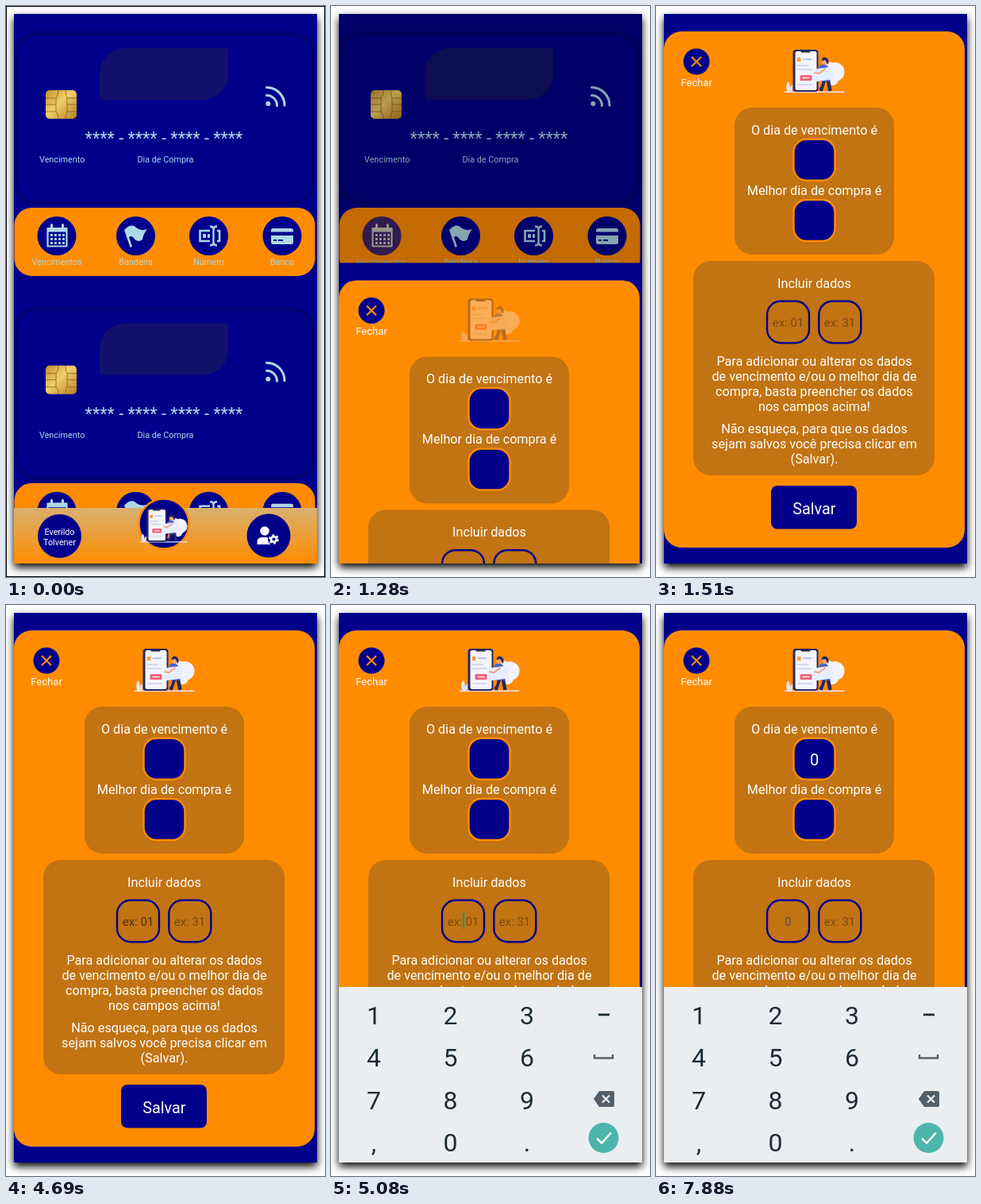
An HTML page that plays this animation: 402x719 px, repeating every 8 s.

```html
<!DOCTYPE html>
<html lang="pt">
<head>
<meta charset="utf-8">
<style>
html, body { margin: 0; width: 100%; height: 100%; overflow: hidden; background: #fff; }
#edge { position: absolute; inset: 0; border: 1px solid #000; }
#phone { position: absolute; left: 10px; top: 10px; width: 382px; height: 692px; overflow: hidden;
  background: #00008b; box-shadow: 0 5px 10px #000; }
svg { display: block; font-family: Roboto, sans-serif; }
</style>
</head>
<body>
<div id="phone"></div>
<div id="edge"></div>
<script>
const NAVY = '#00008b', ORANGE = '#ff8c00', ICE = '#add8e6', PANEL = '#c27312', HINT = '#7b4a12';

const text = (x, y, size, fill, s, extra = 'text-anchor="middle"') =>
  `<text x="${x}" y="${y}" font-size="${size}" fill="${fill}" ${extra}>${s}</text>`;
const rect = (x, y, w, h, r, fill, extra = '') =>
  `<rect x="${x}" y="${y}" width="${w}" height="${h}" rx="${r}" fill="${fill}" ${extra}/>`;
const disc = (x, y, r, fill, extra = '') => `<circle cx="${x}" cy="${y}" r="${r}" fill="${fill}" ${extra}/>`;
const line = (d, color, w, extra = '') =>
  `<path d="${d}" fill="none" stroke="${color}" stroke-width="${w}" ${extra}/>`;
const shape = (d, fill) => `<path d="${d}" fill="${fill}"/>`;
const group = (content, extra = '') => `<g ${extra}>${content}</g>`;

// Person holding a card beside a phone, 76 x 55
const art = () =>
  rect(0, 53.5, 76, 1.5, .7, '#e9e6f7') +
  shape('M4 54Q1 46 5 41Q9 46 7 54M7 54Q7 47 11 45Q12 50 9 54', '#dfe3f5') +
  disc(64, 29, 12, '#f1f2fc') + disc(56, 23, 7, '#f1f2fc') + disc(61, 39, 7, '#f1f2fc') +
  rect(11, 1, 32, 53, 4, '#27275c') + rect(14, 3, 27, 49, 2.5, '#f4f4fd') +
  rect(21, 2, 12, 2.5, 1, '#27275c') + rect(16, 11, 5, 5, 1, '#ff9d3c') +
  rect(23, 12, 12, 2, 1, '#b9c4ee') + rect(16, 20, 15, 2, 1, '#d3d8f2') +
  rect(16, 25, 19, 2, 1, '#d3d8f2') + rect(20, 33, 15, 7, 1.5, '#f0607c') +
  line('M23 36.5h9', '#fff', 1.3) + rect(17, 44, 18, 2, 1, '#d3d8f2') +
  line('M51 38L46 53M55 38L58 53', '#27275c', 4.5) + line('M47 41L45 48', '#f18a3d', 2.5) +
  shape('M44 22Q50 16 56 23L58 41H46Z', '#4961c8') +
  disc(51, 16, 4, '#f3a27c') + shape('M47 15Q48 9 53 11Q58 14 55 20L52 14Z', '#27275c') +
  rect(37, 24, 24, 16, 2, '#e6edff', 'transform="rotate(-8 49 32)"') +
  line('M52 25L44 31L38 30', '#f3a27c', 2);

const icons = [
  line('M52.5 280h24v22.5h-24z', ICE, 2.2, 'stroke-linejoin="round"') + rect(52, 279, 25, 5.5, 1, ICE) +
    line('M57.5 275.5v6M71.5 275.5v6', ICE, 3, 'stroke-linecap="round"') +
    line('M56 288.5h18M56 293.5h18M56 298.5h18', ICE, 2.8, 'stroke-dasharray="2.8 2.25"'),
  shape('M149 282Q158 273 164 279Q170 284 178 281Q173 287 172 294Q165 299 160 291Q157 289 155 291L159 303L156.5 304Z', ICE),
  line('M257 283h-12.5v13h12.5M266 283h3v13h-3', ICE, 2.6) +
    line('M257 277.5q4.500 0 4.500 4v16q0 4 -4.500 4M266 277.500q-4.500 0 -4.500 4v16q0 4 4.500 4', ICE, 2.4) +
    rect(248, 287, 4, 5, 1, ICE) + rect(254, 287, 3, 5, 1, ICE),
  rect(334, 280, 28, 20, 2.5, ICE) + rect(334, 284.5, 28, 4.5, 0, NAVY) +
    line('M337 295h4M343 295h6', NAVY, 2),
];
const labels = ['Vencimentos', 'Bandeira', 'Número', 'Banco'];
const columns = [64, 163.5, 255.5, 348];

const buttons = () => rect(10.5, 254, 379, 86, 22, ORANGE) + columns.map((x, i) =>
  group(disc(x, 289.5, 24.5, NAVY) + icons[i] + text(x, 326, 10.9, ICE, labels[i]), `class="button${i}"`)).join('');

const card = () =>
  rect(14, 37, 371, 209, 25, NAVY, 'style="filter:drop-shadow(0 0 4px #0009)"') +
  shape('M118 85A32 32 0 0 1 150 53H275Q280 53 280 58V86A32 32 0 0 1 248 118H123Q118 118 118 113Z', '#11116b') +
  rect(50, 106, 39, 36, 5, 'url(#gold)') +
  line('M50 116h13v17h-13M63 124h-13M89 116h-12v17h12M77 124h12M63 116q3 -4 3 -10M77 116q-2 -4 -2 -10M63 133q3 3 3 9M77 133q-2 3 -2 9', '#8a6420', .8) +
  disc(330.3, 123, 3, ICE) +
  line('M328.500 112.500a13 13 0 0 1 13 13M328.500 102.500a22.500 22.500 0 0 1 22.500 22.500', ICE, 3, 'stroke-linecap="round"') +
  text(199, 174, 21.6, ICE, Array(4).fill('****').join(' - ')) +
  text(42, 197, 10.8, ICE, 'Vencimento', '') + text(165.5, 197, 10.8, ICE, 'Dia de Compra', '');

const navBar = () =>
  rect(10, 632, 382, 70, 0, 'url(#nav)') +
  disc(67.5, 667.5, 27.5, NAVY) + text(67.5, 666, 10.8, '#fff', 'Everildo') + text(67.5, 679, 10.8, '#fff', 'Tolvener') +
  disc(199, 652, 31.5, NAVY, `stroke="${ORANGE}" stroke-width="2.5"`) +
  group(art(), 'transform="translate(168.500 632) scale(.79)"') +
  disc(331, 667, 27.5, NAVY) + disc(326, 661, 5.8, '#fff') +
  shape('M316.500 678v-3q0 -6 6 -6h7l4 9z', '#fff') +
  disc(337.5, 671.5, 7.5, NAVY) + disc(337.5, 671.5, 3.4, 'none', 'stroke="#fff" stroke-width="2.6"') +
  disc(337.5, 671.5, 5.3, 'none', 'stroke="#fff" stroke-width="2" stroke-dasharray="2.8 2.75"');

const valueBox = y => rect(173.5, y, 52, 52, 16, NAVY, `stroke="${ORANGE}" stroke-width="2.400"`);
const field = x => rect(x, 371.8, 53, 52.4, 17, 'none', `stroke="${NAVY}" stroke-width="2.400"`);
const lines = (y, ...rows) => rows.map((s, i) => text(199.5, y + 19 * i, 16.2, '#fff', s)).join('');

const modal = () =>
  rect(10, 10, 382, 692, 0, NAVY) + rect(10, 32, 379, 650, 22, ORANGE) +
  disc(51, 70, 16.5, NAVY) + line('M45 64l12 12M57 64l-12 12', ORANGE, 2.2) + text(51, 100.5, 13.1, '#fff', 'Fechar') +
  group(group(art(), 'transform="translate(161.500 54)"'), 'id="art"') +
  rect(99, 128, 201, 185, 22, PANEL) +
  lines(162, 'O dia de vencimento é') + valueBox(167.7) + text(199.5, 202, 20, '#fff', '', 'id="value" text-anchor="middle"') +
  lines(238, 'Melhor dia de compra é') + valueBox(244) +
  rect(47, 321, 304, 270, 22, PANEL) + lines(355, 'Incluir dados') +
  field(140) + field(205.3) +
  text(166.5, 403.5, 15, HINT, '', 'id="day" text-anchor="middle"') + text(231.5, 403.5, 15, HINT, 'ex: 31') +
  rect(166, 387, 2, 21, 0, '#00967f', 'id="caret"') +
  lines(453, 'Para adicionar ou alterar os dados', 'de vencimento e/ou o melhor dia de',
    'compra, basta preencher os dados', 'nos campos acima!') +
  lines(537.5, 'Não esqueça, para que os dados', 'sejam salvos você precisa clicar em', '(Salvar).') +
  rect(145, 604, 108, 54.5, 8, NAVY) + text(199.3, 640, 19.8, '#fff', 'Salvar');

const keyboard = () =>
  rect(10, 481, 382, 221, 0, '#ebeef1') + rect(103, 651, 96, 50, 4, '#cdd4d9', 'id="press"') +
  ['123', '456', '789', ',0.'].map((row, r) => [...row].map((key, c) =>
    text(54 + 96.5 * c, 527.5 + 53.6 * r, 32, '#1c2d36', key)).join('')).join('') +
  rect(337, 514.5, 14, 2.8, 0, '#1c2d36') + line('M332 566v4.500h23v-4.500', '#546069', 2.4) +
  shape('M331 622l7 -10h17q2 0 2 2v16q0 2 -2 2h-17z', '#546069') +
  line('M342 617.500l9 9M351 617.500l-9 9', '#ebeef1', 2.2) +
  disc(343.5, 671, 19, '#4db6ac') + line('M335 671.500l6 6l12 -13', '#fff', 2.4);

document.getElementById('phone').innerHTML = `<svg width="382" height="692" viewBox="10 10 382 692">
  <defs>
    <linearGradient id="gold" x2="1" y2="1"><stop stop-color="#c5902c"/><stop offset=".45" stop-color="#f1cf69"/>
      <stop offset=".7" stop-color="#d5a744"/><stop offset="1" stop-color="#b98225"/></linearGradient>
    <linearGradient id="nav" x2="0" y2="1"><stop stop-color="#d9b06f"/><stop offset="1" stop-color="#ff8c00"/></linearGradient>
  </defs>` +
  card() + buttons() + group(card() + buttons(), 'transform="translate(0 346.700)"') + navBar() +
  rect(10, 10, 382, 692, 0, '#000', 'id="dim"') +
  group(modal(), 'id="modal"') + group(keyboard(), 'id="keys"') + '</svg>';

const $ = id => document.getElementById(id);
const set = (id, name, value) => $(id).setAttribute(name, value);
const unit = v => Math.min(1, Math.max(0, v));
const within = (t, a, b) => t >= a && t < b;
const firstButton = document.querySelector('.button0');

// The screen refreshes only at these times (ms)
const TICKS = [0, 500, 1200, 1280, 1350, 1430, 1510, 4690, 4770, 4850, 4920, 5000, 5080, 5150,
  5320, 5780, 6250, 6800, 7270, 7350, 7420, 7500, 7880];

function draw(now) {
  const t = TICKS.findLast(s => s <= now % 8000);
  $('edge').style.display = t < 500 ? '' : 'none';

  const rise = (1 - Math.cos(Math.PI * unit((t - 1121) / 300))) / 2;
  set('modal', 'transform', `translate(0 ${692 * (1 - rise)})`);
  set('dim', 'opacity', .43 * rise);
  set('art', 'opacity', unit((t - 1180) / 300));
  firstButton.setAttribute('opacity', t < 1200 ? 1 : .75);

  const open = unit((t - 4790) / 250);
  set('keys', 'transform', `translate(0 ${221 * (1 - open) ** 2})`);

  const typed = t >= 7350;
  $('value').textContent = typed ? '0' : '';
  $('day').textContent = typed ? '0' : 'ex: 01';
  set('day', 'fill', typed ? '#5c5040' : within(t, 4690, 4770) ? '#4f3010' : HINT);
  set('press', 'opacity', within(t, 7270, 7420) ? 1 : within(t, 7420, 7500) ? .4 : 0);

  const blink = within(t, 4850, 5320) || within(t, 5780, 6250) || within(t, 6800, 7880);
  set('caret', 'opacity', blink ? 1 : 0);
  set('caret', 'x', typed ? 170.5 : 166);
}

const start = performance.now();
function loop() {
  draw(performance.now() - start);
  requestAnimationFrame(loop);
}
loop();
</script>
</body>
</html>
```
